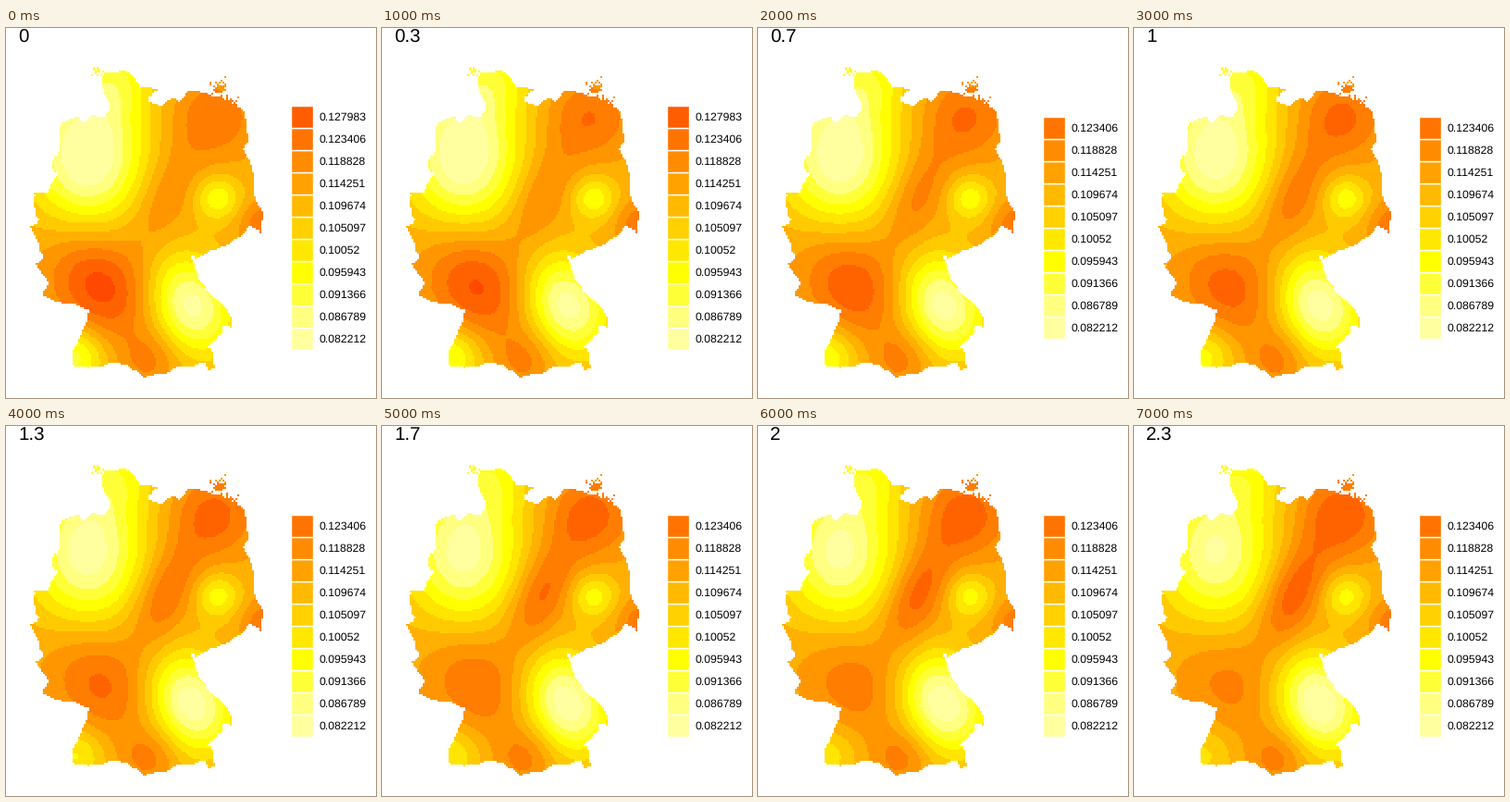
A matplotlib script that plays this animation: 400x400 px, repeating every 8 s.

```python
import numpy as np
import matplotlib.pyplot as plt
from matplotlib.animation import FuncAnimation
from matplotlib.patches import Rectangle
from matplotlib.path import Path

SIZE, CELL, FRAMES = 400, 2, 8
BASE = 6.5

# Corners of the land, clockwise from the north-west coast
LAND = [
    (60, 103), (78, 96), (84, 104), (93, 94), (106, 96), (113, 89),
    (105, 66), (106, 48), (128, 46), (140, 55), (145, 64), (164, 67),
    (152, 78), (168, 84), (180, 76), (188, 80), (196, 69), (222, 73),
    (243, 80), (256, 88), (262, 122), (256, 130), (268, 158), (267, 178),
    (278, 200), (275, 221), (263, 213), (258, 222), (222, 240), (206, 250),
    (199, 244), (208, 270), (222, 290), (245, 316), (243, 323), (235, 321),
    (233, 330), (218, 344), (225, 352), (225, 368), (220, 371), (215, 362),
    (186, 366), (175, 372), (149, 378), (142, 371), (118, 361), (105, 365),
    (72, 364), (72, 350), (88, 313), (90, 305), (60, 297), (40, 288),
    (46, 275), (33, 255), (41, 248), (27, 215), (36, 208), (30, 190),
    (31, 178), (45, 178), (57, 158), (50, 152), (50, 143), (58, 132),
]
# Islands as scattered cells: x, y, spread, count
ISLANDS = [(98, 48, 3, 14), (231, 65, 4.5, 50), (246, 79, 3, 12)]

# x, y, long radius, short radius, angle, height at the start and the end
HILLS = [
    (88, 135, 75, 58, 90, -7.0, -5.7),
    (120, 55, 40, 40, 0, -2.5, -2.1),
    (102, 278, 62, 48, 50, 4.1, 1.9),
    (75, 355, 32, 32, 0, -4.0, -1.8),
    (200, 300, 54, 42, 63, -6.0, -6.6),
    (155, 358, 30, 30, 0, 1.8, 2.0),
    (229, 184, 24, 24, 0, -3.3, -3.0),
    (225, 97, 45, 45, 0, 2.35, 3.3),
    (172, 182, 60, 28, -66, 1.7, 3.6),
    (278, 212, 25, 25, 0, 2.3, 2.0),
]

# Yellow-to-red heat scale, palest first; the map is a little deeper
KEY = np.array([(255, 255, b) for b in (160, 128, 56)]
               + [(255, round(255 * g / 11), 0) for g in range(11, 3, -1)]) / 255
TINT = KEY.copy()
TINT[:, 1] = 1 - 1.12 * (1 - KEY[:, 1])


def ragged(points, rng, rounds=3, rough=0.09):
    """Roughen a closed line by shifting the middle of each edge."""
    p = np.array(points, float)
    for _ in range(rounds):
        edge = np.roll(p, -1, axis=0) - p
        normal = edge[:, ::-1] * (1, -1)
        mid = p + edge / 2 + normal * rng.uniform(-rough, rough, (len(p), 1))
        p = np.stack([p, mid], 1).reshape(-1, 2)
    return Path(p)


def land_mask(x, y):
    rng = np.random.default_rng(4)
    cells = np.c_[x.ravel(), y.ravel()]
    mask = ragged(LAND, rng).contains_points(cells).reshape(x.shape)
    for cx, cy, spread, count in ISLANDS:
        col, row = (rng.normal((cx, cy), spread, (count, 2)) // CELL).astype(int).T
        mask[row, col] = True
    return mask


def hill(x, y, cx, cy, long, short, angle):
    c, s = np.cos(np.radians(angle)), np.sin(np.radians(angle))
    dx, dy = x - cx, y - cy
    return np.exp(-((c * dx + s * dy) / long) ** 2
                  - ((c * dy - s * dx) / short) ** 2)


axis = (np.arange(SIZE // CELL) + 0.5) * CELL
x, y = np.meshgrid(axis, axis)
land = land_mask(x, y)
shapes = [(hill(x, y, *h[:5]), h[5], h[6]) for h in HILLS]

plt.rcParams["text.hinting"] = "none"
fig = plt.figure(figsize=(4, 4), dpi=100, facecolor="white")
ax = fig.add_axes([0, 0, 1, 1])
picture = ax.imshow(np.ones(x.shape + (3,)), extent=(0, SIZE, SIZE, 0),
                    interpolation="nearest")
ax.set(xlim=(0, SIZE), ylim=(SIZE, 0))
ax.axis("off")


def write(x, y, text, px):
    return ax.text(x, y, text, fontsize=px * 0.72, family="Liberation Sans",
                   color="black", va="baseline")


clock = write(13.3, 15.3, "", 20.5)
keys = []
for k, color in enumerate(KEY):
    box = ax.add_patch(Rectangle((307.5, 0), 24, 24, fc=color, ec="white", lw=1))
    value = f"{0.0822117 + k * 0.00457709:.6f}".rstrip("0")
    keys.append((box, write(338.8, 0, value, 12.3)))


def draw(i):
    t = i / (FRAMES - 1)
    top = 10 if i < 2 else 9
    level = BASE + sum(s * (a + (b - a) * t) for s, a, b in shapes)
    image = TINT[np.clip(np.floor(level).astype(int), 0, top)]
    image[~land] = 1
    picture.set_data(image)
    clock.set_text(f"{round(i / 3, 1):g}")
    for k, (box, label) in enumerate(keys):
        mid = 215.5 + (top / 2 - k) * 24
        box.set_y(mid - 12)
        label.set_y(mid + 4.5)
        box.set_visible(k <= top)
        label.set_visible(k <= top)
    return [picture, clock]


anim = FuncAnimation(fig, draw, frames=FRAMES, interval=1000, repeat=True)
plt.show()
```
